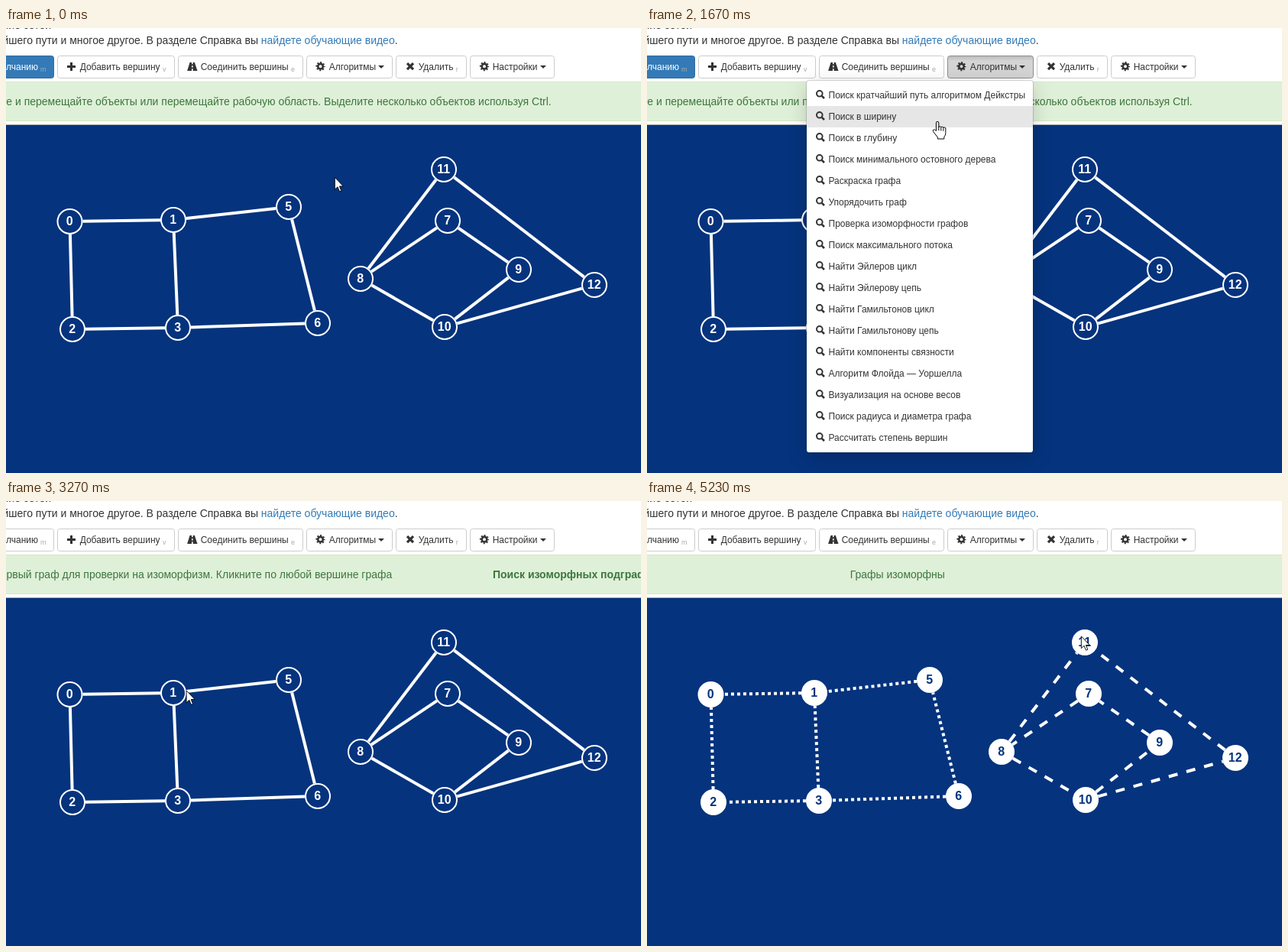
Write an HTML page that moves like this. It is 831 px wide and 582 px high and loops after 7030 ms.

```html
<!DOCTYPE html>
<html lang="ru">
<meta charset="utf-8">
<title>Проверка изоморфности графов</title>
<style>
  html, body { margin: 0; width: 100%; height: 100%; overflow: hidden; background: #fff; }
  svg { display: block; width: 831px; height: 582px; font: 12px "Liberation Sans", Arial, sans-serif; fill: #333; }
  .big { font-size: 14px; }
  .end { text-anchor: end; }
  .sub { font-size: 9px; fill: #aaa; }
  .btn { fill: #fff; stroke: #ccc; }
  .btn.hover { fill: #e6e6e6; stroke: #adadad; }
  .btn.down { fill: #d4d4d4; stroke: #8c8c8c; }
  #mode.on .btn { fill: #337ab7; stroke: #2e6da4; }
  #mode.on .label { fill: #fff; }
  #alert { fill: #3c763d; }
  .line { fill: none; stroke: #333; }
  #panel { fill: #fff; filter: drop-shadow(0 6px 12px rgba(0,0,0,.175)); }
  .graph line { stroke: #fff; stroke-width: 4; }
  .graph circle { fill: #05337d; stroke: #fff; stroke-width: 2; }
  .graph text { fill: #fff; font-size: 16px; font-weight: bold; text-anchor: middle; }
  .graph.on circle { fill: #fff; }
  .graph.on text { fill: #05337d; }
  #left.on line { stroke-dasharray: 4 4; }
  #right.on line { stroke-dasharray: 12 12; }
  .cursor { fill: #fff; stroke: #000; stroke-linejoin: round; }
</style>
<body>
<script>
const LOOP = 7030, STEP = 200 / 3, ROW = 28, MENU_TOP = 74, RADIUS = 17;

const nodes = {
  0: [83.5, 253], 1: [219, 251], 2: [87, 394], 3: [225, 392], 5: [370, 234], 6: [408, 386],
  7: [578, 252], 8: [464, 328], 9: [671, 316], 10: [574, 391], 11: [573, 185], 12: [770, 336]
};
const algorithms = [
  'Поиск кратчайший путь алгоритмом Дейкстры', 'Поиск в ширину', 'Поиск в глубину',
  'Поиск минимального остовного дерева', 'Раскраска графа', 'Упорядочить граф',
  'Проверка изоморфности графов', 'Поиск максимального потока', 'Найти Эйлеров цикл',
  'Найти Эйлерову цепь', 'Найти Гамильтонов цикл', 'Найти Гамильтонову цепь',
  'Найти компоненты связности', 'Алгоритм Флойда — Уоршелла', 'Визуализация на основе весов',
  'Поиск радиуса и диаметра графа', 'Рассчитать степень вершин'
];
// Each move eases out to x, y; bend is the vertical ease power
const home = { x: 430, y: 195 };
const moves = [
  { from: 60, to: 800, x: 433.5, y: 43.5, bend: 1.6 },
  { from: 1390, to: 2450, x: 344, y: 249, bend: 1.6 },
  { from: 2870, to: 3590, x: 225, y: 247, bend: 1.6 },
  { from: 3880, to: 4560, x: 573, y: 186, bend: .65 },
  { from: 4660, to: 4730, x: 568, y: 176.5, bend: 1 }
];
const clicks = [[870, 1060], [2670, 2800], [3680, 3750], [5100, 5230]];

const text = (x, y, s, cls = '') => `<text x="${x}" y="${y}" class="${cls}">${s}</text>`;
const message = (...args) => `<g class="msg">${text(...args)}</g>`;
const sub = s => ` <tspan class="sub" dy="2">${s}</tspan>`;
const caret = x => `<path d="M${x} 49h8l-4 4z"/>`;
const cog = x => `<g class="line"><circle cx="${x}" cy="50.2" r="3.3" stroke-width="2.6"/>
  <circle cx="${x}" cy="50.2" r="5.1" stroke-width="2" stroke-dasharray="2 2.005" stroke-dashoffset="1"/></g>`;
const button = (x, w, label, icon, id = '') =>
  `<rect class="btn" id="${id}" x="${x + .5}" y="36.5" width="${w - 1}" height="29" rx="3"/>
   ${id && '<rect id="inset" x="394" y="37" width="111" height="28" rx="2" fill="url(#shade)"/>'}
   ${icon}${text(x + 29.67, 55, label)}`;

function edge(pair) {
  const [[ax, ay], [bx, by]] = pair.split('-').map(n => nodes[n]);
  const k = RADIUS / Math.hypot(bx - ax, by - ay), dx = (bx - ax) * k, dy = (by - ay) * k;
  return `<line x1="${ax + dx}" y1="${ay + dy}" x2="${bx - dx}" y2="${by - dy}"/>`;
}

function node(name) {
  const [x, y] = nodes[name];
  return `<circle cx="${x}" cy="${y}" r="${RADIUS - 1}"/>` + text(x - .3, y + 4.7, name);
}

function graph(id, pairs) {
  const edges = pairs.split(' '), names = new Set(pairs.split(/[ -]/));
  return `<g class="graph" id="${id}">${edges.map(edge).join('')}${[...names].map(node).join('')}</g>`;
}

const menuItem = (label, i) => {
  const y = MENU_TOP + i * ROW;
  return `<g class="line" stroke-width="2"><circle cx="225.8" cy="${y + 11.8}" r="3.8"/>
    <path d="M228.8 ${y + 14.8}l3.2 3.2" stroke-width="2.6"/></g>` + text(237.5, y + 18, label);
};

document.body.innerHTML = `<svg viewBox="0 0 831 582">
  <linearGradient id="shade" x2="0" y2="1">
    <stop stop-opacity=".11"/><stop offset=".22" stop-opacity="0"/>
  </linearGradient>
  ${text(59, .5, 'Создание сетей', 'big end')}
  ${text(512.6, 21, 'кратчайшего пути и многое другое. В разделе Справка вы <tspan fill="#337ab7">найдете обучающие видео</tspan>.', 'big end')}
  <g id="mode"><rect class="btn" x="-60.5" y="36.5" width="123" height="29" rx="3"/>
    ${text(42, 55, 'По умолчанию', 'label end')}${text(52.5, 57, 'm', 'sub end')}</g>
  ${button(67, 154, 'Добавить вершину' + sub('v'), '<path class="line" stroke-width="3" d="M80 50.5h11M85.5 45v11"/>')}
  ${button(225, 164, 'Соединить вершины' + sub('e'),
    '<path d="M240.6 45h6.2l3.7 11h-13.4z"/><path stroke="#fff" stroke-width="1.6" d="M243.8 44.5v2.7m0 2v2.3m0 1.7v3"/>')}
  ${button(393, 113, 'Алгоритмы', cog(411.5), 'algo')}${caret(487)}
  ${button(510, 93, 'Удалить' + sub('r'), '<path class="line" stroke-width="3.2" d="M525 46.2l8 8m0-8l-8 8"/>')}
  ${button(607, 111, 'Настройки', cog(626))}${caret(699)}
  <g id="alert">
    <rect x="-5" y="70.5" width="841" height="51" fill="#dff0d8" stroke="#d6e9c6"/>
    ${message(713.7, 101, 'Выделяйте и перемещайте объекты или перемещайте рабочую область. Выделите несколько объектов используя Ctrl.', 'big end')}
    ${message(505.3, 101, 'Выберите первый граф для проверки на изоморфизм. Кликните по любой вершине графа', 'big end')}
    ${message(503, 101, 'Выберите второй граф для проверки на изоморфизм. Кликните по любой вершине графа', 'big end')}
    ${message(265.7, 101, 'Графы изоморфны', 'big')}
    <g id="mark" font-weight="bold">${text(637, 101, 'Поиск изоморфных подграфов', 'big')}</g>
  </g>
  <rect y="126" width="831" height="456" fill="#05337d"/>
  <rect y="126" width="831" height="1" fill="#aaa"/>
  ${graph('left', '1-0 2-0 3-1 3-2 5-1 6-5 6-3')}
  ${graph('right', '7-8 9-7 10-9 8-10 8-11 12-11 10-12')}
  <g id="menu">
    <rect id="panel" x="209" y="69" width="296" height="486" rx="3"/>
    <rect x="208.5" y="68.5" width="297" height="487" rx="3.5" fill="none" stroke="#000" stroke-opacity=".15"/>
    <rect id="row" x="209" width="296" height="28" fill="#e6e6e6"/>
    <rect id="focus" x="211" y="244" width="292" height="25" rx="2" fill="#d4d4d4" stroke="#101010" stroke-width="2"/>
    ${algorithms.map(menuItem).join('')}
  </g>
  <g id="pointer">
    <circle id="click" r="11.5" fill="#f2e53a" fill-opacity=".85"/>
    <path id="arrow" class="cursor" stroke-width=".9" d="M.3.3V16.2L4 12.8 6.5 18.7 8.8 17.8 6.4 12H11.3z"/>
    <path id="hand" class="cursor" transform="translate(-6.7 -.8)" d="M5 13V2.5a1.7 1.7 0 0 1 3.4 0V8.5a1.5 1.5 0 0 1 3 .3a1.5 1.5 0 0 1 3 .7a1.5 1.5 0 0 1 3 1V16q0 3-2 5V23.5H7V21.5L1.2 14q-1.2-2 .6-2.7q1.2-.3 2 .7zM8.4 8.5v4M11.4 9v4M14.4 9.8v3.4"/>
  </g>
</svg>`;

const $ = id => document.getElementById(id);
const messages = [...document.querySelectorAll('.msg')];
const show = (el, on) => { el.style.display = on ? '' : 'none'; };

function pointerAt(t) {
  let { x, y } = home;
  for (const m of moves) {
    const rest = 1 - Math.min(1, Math.max(0, (t - m.from) / (m.to - m.from)));
    x = m.x + (x - m.x) * rest ** 3;
    y = m.y + (y - m.y) * rest ** m.bend;
  }
  return [x, y];
}

function draw(t) {
  const [x, y] = pointerAt(Math.floor(t / STEP) * STEP);
  const open = t >= 1060 && t < 2800, focused = t >= 2670;
  const hand = t < 1060 ? y < 66 : t < 2940;
  const row = Math.floor((y - MENU_TOP) / ROW);
  const down = t >= 930 && t < 2670;

  $('pointer').setAttribute('transform', `translate(${x} ${y})`);
  show($('hand'), hand);
  show($('arrow'), !hand);
  show($('click'), clicks.some(([a, b]) => t >= a && t < b));

  $('algo').setAttribute('class', 'btn' + (down ? ' down' : t < 2800 && hand ? ' hover' : ''));
  show($('inset'), t >= 930 && t < 2800);
  show($('menu'), open);
  show($('row'), row >= 0 && !focused);
  $('row').setAttribute('y', MENU_TOP + row * ROW);
  show($('focus'), focused);

  const stage = [2800, 3750, 5230].filter(s => t >= s).length;
  messages.forEach((m, i) => show(m, i === stage));
  show($('mark'), stage === 1 || stage === 2);
  $('mode').classList.toggle('on', stage === 0);
  $('left').classList.toggle('on', stage > 1);
  $('right').classList.toggle('on', stage > 2);
}

const start = performance.now();
function tick() {
  draw((performance.now() - start) % LOOP);
  requestAnimationFrame(tick);
}
tick();
</script>
</body>
</html>
```
